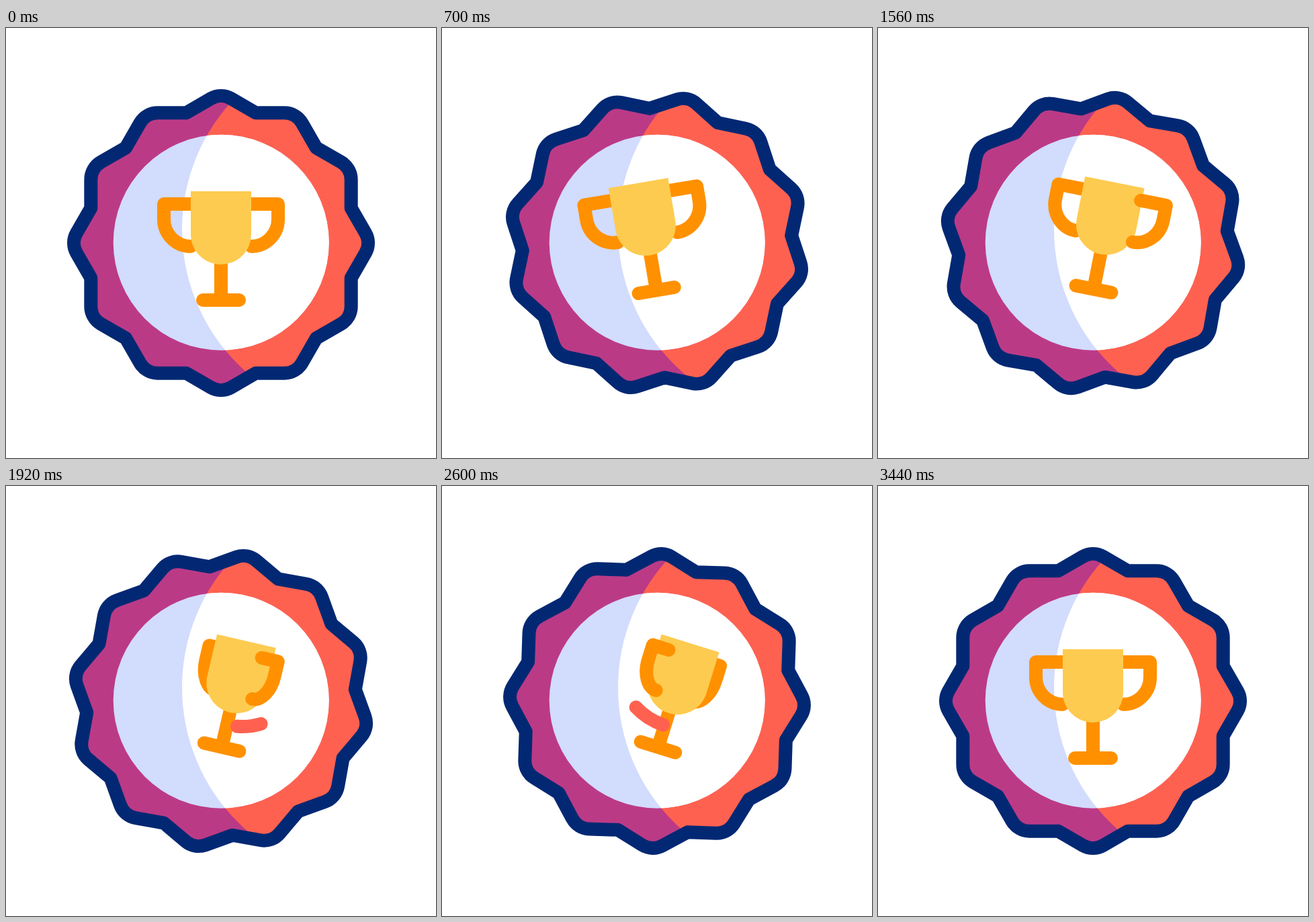
Write an HTML page that moves like this. It is 640 by 640 pixels and loops after 3600 ms.

```html
<!DOCTYPE html>
<html lang="en">
<head>
<meta charset="utf-8">
<title>Trophy badge</title>
<style>
  html, body { margin: 0; width: 100%; height: 100%; overflow: hidden; background: #fff; }
  svg { display: block; width: 100%; height: 100%; }
  .line { fill: none; stroke: #ff9100; stroke-width: 20; stroke-linecap: round; stroke-linejoin: round; }
</style>
</head>
<body>
<svg viewBox="0 0 640 640">
  <defs>
    <path id="rosette"/>
    <clipPath id="inBadge"><use id="clipRosette" href="#rosette"/></clipPath>
    <clipPath id="inDisc"><circle cx="320.2" cy="319.2" r="160.5"/></clipPath>
  </defs>
  <use id="fillRosette" href="#rosette" fill="#bb3a86"/>
  <circle cx="545" cy="300" r="283" fill="#ff6150" clip-path="url(#inBadge)"/>
  <circle cx="320.2" cy="319.2" r="160.5" fill="#d2dcfd"/>
  <circle cx="545" cy="300" r="283" fill="#fff" clip-path="url(#inDisc)"/>
  <use id="edgeRosette" href="#rosette" fill="none" stroke="#032873" stroke-width="20" stroke-linejoin="round"/>
  <g id="trophy">
    <path class="line" d="M320 340V405M293 405H347"/>
    <path class="line" id="farHandle"/>
    <path class="line" id="restHandle"/>
    <path d="M275 243H365V307A45 45 0 0 1 275 307Z" fill="#fdcb50"/>
    <path class="line" id="nearHandle"/>
    <path class="line" id="swirl" style="stroke:#ff6150"/>
  </g>
</svg>
<script>
const LOOP = 3600, STEP = 20;
const el = id => document.getElementById(id);
const rad = deg => deg * Math.PI / 180;
const smooth = p => p * p * (3 - 2 * p);
const linear = p => p;
const progress = (t, a, b) => Math.min(1, Math.max(0, (t - a) / (b - a)));

// Value at time t along [time, value] keys.
function track(keys, t, ease = smooth) {
  const i = keys.findIndex(k => t < k[0]);
  if (i === 0) return keys[0][1];
  if (i < 0) return keys[keys.length - 1][1];
  const [t0, v0] = keys[i - 1], [t1, v1] = keys[i];
  return v0 + (v1 - v0) * ease((t - t0) / (t1 - t0));
}

// Angle in degrees, clockwise from the top.
const polar = (r, deg, x = 320, y = 320) => [x + r * Math.sin(rad(deg)), y - r * Math.cos(rad(deg))];
const pt = p => p.map(n => n.toFixed(2)).join(' ');

function rosettePath() {
  let d = '';
  for (let a = 0; a < 360; a += 30) {
    const hub = polar(189, a);
    d += `${a ? 'L' : 'M'}${pt(polar(200.5, a - 15))}L${pt(polar(30, a - 30, ...hub))}` +
         `A30 30 0 0 1 ${pt(polar(30, a + 30, ...hub))}`;
  }
  return d + 'Z';
}

// Handle turned about the cup's axis; s runs from 1 (right) to -1 (left).
function handlePath(s) {
  const x = n => (320 + n * s).toFixed(2);
  return `M${x(45)} 262H${x(85)}V284.5C${x(85)} 307 ${x(67)} 325 ${x(45)} 325`;
}

function swirlPath(head, tail) {
  if (head <= tail) return '';
  const at = p => pt(polar(99, 150.3 + 59.4 * p, 320, 272));
  return `M${at(tail)}A99 99 0 0 1 ${at(head)}`;
}

const lift = [[200, 0], [600, -17.3], [1000, 0], [1400, -16.5], [3000, -16.5], [3400, 0]];
const hop = [[200, 0], [600, -11.4], [1000, 0], [1400, 10.3], [3000, 10.3], [3400, 0]];
const lean = [[3000, 9.8], [3400, 0]];
const turn = [[1400, 0], [2320, 0.51], [3000, 1]];

function draw(t) {
  const angle = 180 * smooth(progress(t, 200, 3400));
  for (const id of ['clipRosette', 'fillRosette', 'edgeRosette'])
    el(id).setAttribute('transform', `rotate(${angle} 320 320)`);

  const u = track(turn, t, linear);
  const tilt = track(hop, t) + u * track(lean, t);
  el('trophy').setAttribute('transform', `translate(0 ${track(lift, t)}) rotate(${tilt} 320 410)`);

  const s = Math.cos(Math.PI * u);
  const spinning = u > 0 && u < 1;
  el('farHandle').setAttribute('d', handlePath(-s));
  el('restHandle').setAttribute('d', spinning ? '' : handlePath(s));
  el('nearHandle').setAttribute('d', spinning ? handlePath(s) : '');
  el('swirl').setAttribute('d', swirlPath(
    smooth(progress(t, 1600, 2400)), smooth(progress(t, 2120, 3050))));
}

el('rosette').setAttribute('d', rosettePath());
const start = performance.now();
function tick() {
  const t = (performance.now() - start) % LOOP;
  draw(Math.floor(t / STEP) * STEP);
  requestAnimationFrame(tick);
}
tick();
</script>
</body>
</html>
```
